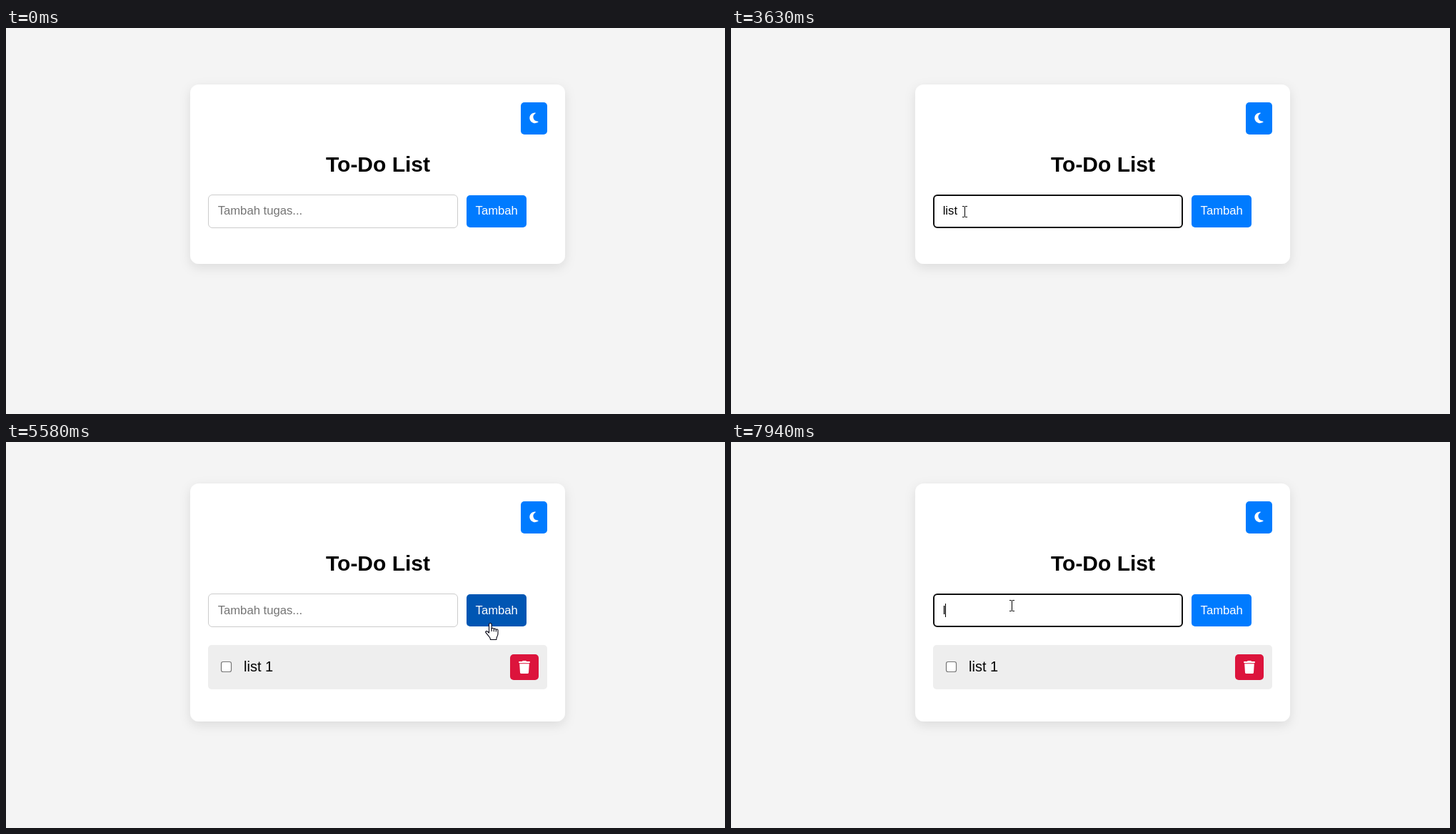
Animation, 1007 px wide and 540 px high, one loop 8000 ms. Source, as an HTML page:

```html
<!DOCTYPE html>
<html lang="id">
<head>
<meta charset="utf-8">
<title>To-Do List</title>
<style>
  html, body { margin: 0; width: 100%; height: 100%; overflow: hidden; background: #f4f4f4; }
  svg { display: block; width: 1007px; height: 540px; }
  text { font: 16.67px "Liberation Sans", Arial, sans-serif; white-space: pre; }
  .title { font-size: 30px; font-weight: bold; text-anchor: middle; }
  .task { font-size: 20px; }
  .ibeam { mix-blend-mode: difference; }
</style>
</head>
<body>
<svg viewBox="0 0 1007 540">
  <defs>
    <filter id="shadow" x="-10%" y="-20%" width="120%" height="140%">
      <feDropShadow dx="0" dy="5" stdDeviation="7.5" flood-opacity=".1"/>
    </filter>
  </defs>
  <rect width="1007" height="540" fill="#f4f4f4"/>

  <g id="page">
    <rect id="card" x="258" y="79" width="525" height="251" rx="12" fill="#fff" filter="url(#shadow)"/>
    <rect x="721" y="104" width="37" height="45" rx="5" fill="#007bff"/>
    <path fill="#fff" d="M742 118.7A7.3 7.3 0 1 0 745.9 130.9L744.1 130.4A5.73 5.73 0 0 1 741.3 119.7Z"/>
    <text class="title" x="521" y="201">To-Do List</text>
    <rect id="field" fill="#fff"/>
    <text id="entry" x="296.67"></text>
    <rect id="caret" y="247" width="1" height="19"/>
    <rect id="button" x="645" y="234" width="84" height="45" rx="5"/>
    <text id="label" x="657.6" fill="#fff">Tambah</text>
  </g>

  <g id="item">
    <rect x="283" y="284" width="475" height="62" rx="5" fill="#eee"/>
    <rect x="301.5" y="307.5" width="14" height="14" rx="2.5" fill="#fff" stroke="#767676" stroke-width="1.2"/>
    <text class="task" x="333" y="321">list 1</text>
    <rect x="706" y="297" width="40" height="36" rx="5" fill="#dc143c"/>
    <path fill="#fff" d="M723 307l.7-1h4.6l.7 1h4q1 0 1 1.1T733 309.2H719q-1 0-1-1.1t1-1.1zM719.2 310.3H732.8L732 322.4Q731.9 324 730.3 324H721.7Q720.1 324 720 322.4Z"/>
  </g>

  <g id="arrow">
    <path fill="#fff" stroke="#000" d="M.5.5V16.6L4.3 13 6.8 18.5 9 17.5 6.6 12H11.5Z"/>
  </g>
  <g id="ibeam" class="ibeam">
    <path fill="none" stroke="#fff" d="M-3-7.5H0M1-7.5H4M.5-7V7M-3 7.5H0M1 7.5H4"/>
  </g>
  <g id="hand">
    <g transform="translate(-6 -3)" stroke="#000010" stroke-width="1.1" stroke-linejoin="round">
      <path fill="#fff" d="M5.5 14V2.3a1.8 1.8 0 0 1 3.6 0V8.2a1.7 1.7 0 0 1 3.2.6 1.7 1.7 0 0 1 3 .8 1.5 1.5 0 0 1 2.7 1V15q0 2.5-1.2 4.2-1 1.4-1 4.3H7.5q-.2-2.5-2-4.3L1 13.7q-.8-1.5.4-2 1.3-.4 2.4.8Z"/>
      <path fill="none" d="M9.1 8V12M12.3 8.8V12.3M15.3 9.6V12.6"/>
    </g>
  </g>
  <circle id="halo" r="15" fill="#ff0" fill-opacity=".55"/>
</svg>

<script>
const LOOP = 8000, TICK = 68, BLINK = 530, PRESS = 65;
const ADDED = 5580, LIFT = 21;
const el = Object.fromEntries([...document.querySelectorAll('[id]')].map(e => [e.id, e]));

const glides = [
  { start: 330, end: 806, from: [658, 464], to: [327, 257] },
  { start: 4552, end: 5166, from: [327, 257], to: [677, 256] },
  { start: 5782, end: 6190, from: [677, 256], to: [420, 206] },
  { start: 6460, end: 6800, from: [417, 211], to: [393, 229] }
];
const clicks = [1080, 5510, 7010];
const word = 'list 1';
const entries = [
  { focus: clicks[0], blur: clicks[1], clear: ADDED, keys: [2420, 2620, 2830, 3100, 3830, 4020] },
  { focus: clicks[2], blur: LOOP, clear: LOOP, keys: [7940] }
];

const ease = u => u * u * (3 - 2 * u);
const show = (e, on) => e.setAttribute('visibility', on ? 'visible' : 'hidden');
const set = (e, attrs) => { for (const k in attrs) e.setAttribute(k, attrs[k]); };
const inside = (x, y, l, t, r, b) => x >= l && x < r && y >= t && y < b;

function pointerAt(t) {
  const g = glides.findLast(g => t >= g.start);
  if (!g) return null;
  const moved = Math.floor((t - g.start) / TICK) * TICK;
  const u = ease(Math.min(1, moved / (g.end - g.start)));
  return g.from.map((a, i) => Math.round(a + (g.to[i] - a) * u));
}

function drawPointer(t, lift) {
  const spot = pointerAt(t);
  const [x, y] = spot || [-99, -99];
  const overButton = inside(x, y + lift, 645, 234, 729, 279);
  const overField = inside(x, y + lift, 283, 233, 633, 280);
  const kind = overButton ? 'hand' : overField ? 'ibeam' : 'arrow';
  for (const id of ['arrow', 'ibeam', 'hand']) {
    show(el[id], spot && id === kind);
    set(el[id], { transform: `translate(${x} ${y})` });
  }
  set(el.button, { fill: overButton ? '#0056b3' : '#007bff' });
  set(el.halo, { cx: x - 2, cy: y - 1 });
  show(el.halo, clicks.some(c => t >= c && t < c + PRESS));
}

function drawField(t, baseline) {
  const entry = entries.find(e => t >= e.focus && t < e.clear);
  const keys = entry ? entry.keys.filter(k => k <= t) : [];
  const text = word.slice(0, keys.length);
  const focus = entry && t < entry.blur;

  const w = focus ? 2 : 1;
  set(el.field, {
    x: 283 + w / 2, y: 233 + w / 2, width: 350 - w, height: 47 - w, rx: 6 - w / 2,
    stroke: focus ? '#101010' : '#ccc', 'stroke-width': w
  });

  el.entry.textContent = text;
  const end = text ? el.entry.getComputedTextLength() : 0;
  el.entry.textContent = text || 'Tambah tugas...';
  set(el.entry, { y: baseline, fill: text ? '#000' : '#757575' });

  const idle = focus ? t - (keys.at(-1) || entry.focus) : 0;
  set(el.caret, { x: Math.round(296.67 + end) });
  show(el.caret, focus && Math.floor(idle / BLINK) % 2 === 0);
}

function draw(t) {
  const added = t >= ADDED, lift = added ? LIFT : 0;
  const baseline = added ? 262 : 261;
  set(el.page, { transform: `translate(0 ${-lift})` });
  set(el.card, { height: added ? 333 : 251 });
  set(el.label, { y: baseline });
  show(el.item, added);
  drawField(t, baseline);
  drawPointer(t, lift);
}

const start = performance.now();
function frame() {
  draw((performance.now() - start) % LOOP);
  requestAnimationFrame(frame);
}
frame();
</script>
</body>
</html>
```
